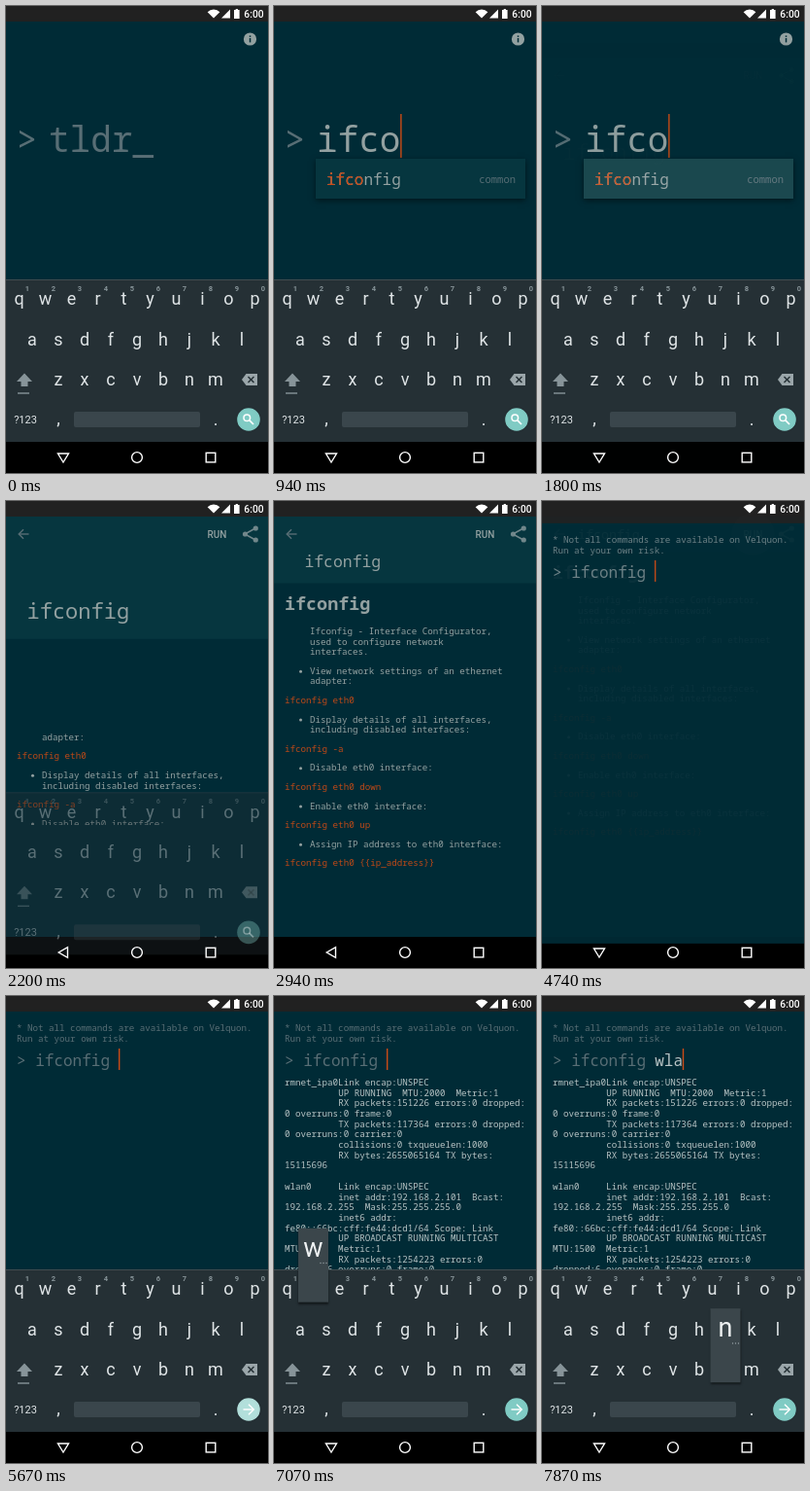
These frames come from a looping animation (270x480 px, 8 s). An HTML page with a canvas:

```html
<!DOCTYPE html>
<html lang="en">
<head>
<meta charset="utf-8">
<title>Command help app</title>
<style>
  html, body { margin: 0; width: 100%; height: 100%; overflow: hidden; background: #000; }
  canvas { display: block; width: 270px; height: 480px; }
</style>
</head>
<body>
<canvas id="stage"></canvas>
<script>
const W = 270, H = 480, LOOP = 8000;
const MONO = '"Noto Sans Mono", monospace', SANS = 'Roboto, sans-serif';
const BG = '#002b36', PANEL = '#06363f', DIM = '#586e75', SOFT = '#93a1a1', BRIGHT = '#b7c3c4', ORANGE = '#cb4b16';
const KEYBOARD = '#253035';

const canvas = document.getElementById('stage');
const ctx = canvas.getContext('2d');
const ratio = window.devicePixelRatio || 1;
canvas.width = W * ratio;
canvas.height = H * ratio;

const clamp = v => Math.max(0, Math.min(1, v));
const progress = (t, start, length) => clamp((t - start) / length);
const mix = (a, b, p) => a + (b - a) * p;

function rect(x, y, w, h, color) {
  ctx.fillStyle = color;
  ctx.fillRect(x, y, w, h);
}
function disc(x, y, r, color) {
  ctx.fillStyle = color;
  ctx.beginPath();
  ctx.arc(x, y, r, 0, 7);
  ctx.fill();
}
function shape(points, color, lineWidth, close) {
  ctx.beginPath();
  points.forEach(([x, y]) => ctx.lineTo(x, y));
  if (close) ctx.closePath();
  if (lineWidth) {
    ctx.strokeStyle = color;
    ctx.lineWidth = lineWidth;
    ctx.stroke();
  } else {
    ctx.fillStyle = color;
    ctx.fill();
  }
}
function text(str, x, y, size, color, { font = MONO, weight = 400, align = 'left' } = {}) {
  ctx.font = `${weight} ${size}px ${font}`;
  ctx.textAlign = align;
  ctx.fillStyle = color;
  ctx.fillText(str, x, y);
}
const label = (str, x, y, size, color, weight) => text(str, x, y, size, color, { font: SANS, weight, align: 'center' });

function layer(dy, alpha, draw) {
  ctx.save();
  ctx.globalAlpha = alpha;
  ctx.translate(0, dy);
  draw();
  ctx.restore();
}
function clipped(x, y, w, h, draw) {
  ctx.save();
  ctx.beginPath();
  ctx.rect(x, y, w, h);
  ctx.clip();
  draw();
  ctx.restore();
}
function raised(x, y, w, h, color, blur) {
  ctx.save();
  ctx.shadowColor = 'rgba(0,0,0,.5)';
  ctx.shadowBlur = blur * ratio;
  ctx.shadowOffsetY = 2 * ratio;
  rect(x, y, w, h, color);
  ctx.restore();
}

// Window with its own status and navigation bar backgrounds
function appWindow(draw) {
  rect(0, 0, W, 16, '#212121');
  rect(0, 16, W, 432, BG);
  rect(0, 448, W, 32, '#000');
  draw();
}
// A new window slides up and fades in
function enter(t, start, draw) {
  if (t < start) return;
  const dy = 38 * (1 - progress(t, start, 350)) ** 5;
  const alpha = 1 - (1 - progress(t, start, 200)) ** 4;
  layer(dy, alpha, () => appWindow(draw));
}

// Key presses: [key, down, up]
const presses = [
  ['i', 200, 270], ['f', 400, 470], ['c', 600, 670], ['o', 800, 870],
  ['w', 7070, 7200], ['l', 7340, 7470], ['a', 7540, 7670], ['n', 7870, 8000]
];
const typed = (t, from) => presses.filter(([, down, up]) => down >= from && t >= up).map(p => p[0]).join('');

const rows = [['qwertyuiop', 13.5, 307.3], ['asdfghjkl', 27, 348.6], ['zxcvbnm', 54, 389.8]];
const keys = {};
for (const [letters, x, y] of rows) [...letters].forEach((k, i) => keys[k] = [x + 27 * i, y]);

function keyboard(t) {
  const ink = '#dfe4e6', faint = '#879499', search = t < 3000;
  rect(0, 281, W, 167, KEYBOARD);
  rect(0, 281, W, 1, '#414c50');
  for (const k in keys) label(k, ...keys[k], 18, ink);
  [...'1234567890'].forEach((d, i) => label(d, 22 + 27 * i, 293, 7.5, faint, 700));
  shape([[11, 386], [19, 377.5], [27, 386], [22.5, 386], [22.5, 391], [15.5, 391], [15.5, 386]], faint, 0, true);
  rect(12, 397.3, 12, 1.4, faint);
  shape([[243, 384], [247.5, 378], [259, 378], [259, 390], [247.5, 390]], '#9ba6aa', 0, true);
  shape([[249.5, 381], [255.5, 387]], KEYBOARD, 1.5);
  shape([[255.5, 381], [249.5, 387]], KEYBOARD, 1.5);
  label('?123', 20, 429, 11, ink);
  label(',', 54, 430, 18, ink);
  label('.', 216, 431, 18, ink);
  ctx.fillStyle = '#3a464c';
  ctx.beginPath();
  ctx.roundRect(70, 417, 130, 16, 2);
  ctx.fill();
  disc(250, 425, 11.8, t >= 5670 && t < 5800 ? '#b2dfdb' : '#80cbc4');
  if (search) {
    ctx.beginPath();
    ctx.arc(248.3, 423.3, 3.3, 0, 7);
    ctx.strokeStyle = '#fff';
    ctx.lineWidth = 1.5;
    ctx.stroke();
    shape([[250.7, 425.7], [255, 430]], '#fff', 1.7);
  } else {
    shape([[244.5, 425], [255, 425]], '#fff', 1.4);
    shape([[250, 419.7], [255.3, 425], [250, 430.3]], '#fff', 1.4);
  }
}
function keyPopup(t) {
  const press = presses.find(([, down, up]) => t >= down && t < up);
  if (!press) return;
  const [x, y] = keys[press[0]];
  raised(x - 15.5, y - 68.6, 31, 76, '#3b464b', 2);
  label(press[0], x, y - 39.5, 27, '#eef1f2');
  for (let i = 0; i < 3; i++) disc(x + 7.5 + 3 * i, y - 32.8, .7, '#98a3a7');
}

function searchScreen(t) {
  const query = typed(t, 0).slice(0, 4);
  disc(251.5, 34, 6.6, SOFT);
  rect(250.8, 33, 1.5, 4.4, BG);
  rect(250.8, 30.4, 1.5, 1.5, BG);
  text('>', 10.7, 150, 36, DIM);
  text(query || 'tldr_', 44, 150, 36, query ? SOFT : DIM);
  if (query) rect(44 + 21.6 * query.length - .2, 111, 1.4, 45, ORANGE);
  const found = typed(t - 70, 0).length;
  if (!found) return;
  raised(43, 157, 216, 41, PANEL, 6);
  text('ifconfig', 54, 183.5, 16, SOFT);
  text('ifconfig'.slice(0, found), 54, 183.5, 16, ORANGE);
  text('common', 249, 181.5, 10.5, DIM, { align: 'right' });
  const p = progress(t, 1400, 450);
  if (p > 0) clipped(43, 157, 216, 41, () => disc(150, 178, 12 + 150 * p, 'rgba(255,255,255,.09)'));
}

// '-' marks a bullet, '$' a command
const help = [
  ' Ifconfig - Interface Configurator,\nused to configure network\ninterfaces.',
  '-View network settings of an ethernet\nadapter:', '$ifconfig eth0',
  '-Display details of all interfaces,\nincluding disabled interfaces:', '$ifconfig -a',
  '-Disable eth0 interface:', '$ifconfig eth0 down',
  '-Enable eth0 interface:', '$ifconfig eth0 up',
  '-Assign IP address to eth0 interface:', '$ifconfig eth0 {{ip_address}}'
];
function helpText() {
  text('ifconfig', 11, 80, 18.4, SOFT, { weight: 700 });
  let y = 105;
  for (const item of help) {
    const command = item[0] === '$';
    if (item[0] === '-') disc(27.5, y - 2.7, 1.5, SOFT);
    item.slice(1).split('\n').forEach((line, i) => {
      if (i) y += 10.6;
      text(line, command ? 11 : 37, y, 9.2, command ? '#bd4917' : SOFT);
    });
    y += 19.6;
  }
}
function detailScreen(t) {
  const open = (1 - progress(t, 2500, 1100)) ** 2;
  const shift = 89.3 * open;
  const body = () => layer(shift, ctx.globalAlpha, helpText);
  if (t >= 2270) clipped(0, 16, W, 432, body);
  else if (t >= 2140) clipped(0, 237.5, W, 95.5, body);
  rect(0, 16, W, 36.5 + shift, PANEL);
  text('ifconfig', mix(37, 21.5, open), mix(38.8, 121, open), mix(13.3, 22, open), SOFT);
  shape([[23.5, 34], [13.5, 34]], DIM, 1.4);
  shape([[18, 29.2], [13.2, 34], [18, 38.8]], DIM, 1.4);
  label('RUN', 217.5, 37.7, 10, SOFT, 500);
  const share = '#71878b';
  shape([[258, 27.5], [246, 34], [258, 40.5]], share, 1.5);
  for (const [x, y] of [[257.3, 28], [246.5, 34], [257.3, 40]]) disc(x, y, 2.6, share);
  const p = progress(t, 4540, 150);
  if (p > 0) disc(217.5, 34, 6 + 16 * p, 'rgba(255,255,255,.1)');
}

const output = `rmnet_ipa0Link encap:UNSPEC
          UP RUNNING  MTU:2000  Metric:1
          RX packets:151226 errors:0 dropped:
0 overruns:0 frame:0
          TX packets:117364 errors:0 dropped:
0 overruns:0 carrier:0
          collisions:0 txqueuelen:1000
          RX bytes:2655065164 TX bytes:
15115696

wlan0     Link encap:UNSPEC
          inet addr:192.168.2.101  Bcast:
192.168.2.255  Mask:255.255.255.0
          inet6 addr:
fe80::66bc:cff:fe44:dcd1/64 Scope: Link
          UP BROADCAST RUNNING MULTICAST
MTU:1500  Metric:1
          RX packets:1254223 errors:0
dropped:6 overruns:0 frame:0`.split('\n');

function runScreen(t) {
  const p = progress(t, 4740, 360);
  const ink = `rgb(${mix(115, 88, p)},${mix(134, 110, p)},${mix(138, 117, p)})`;
  const args = typed(t, 5000);
  text('* Not all commands are available on Velquon.', 11, 36.3, 9.2, ink);
  text('Run at your own risk.', 11, 47, 9.2, ink);
  text('> ifconfig', 11, 71.7, 16, ink);
  text(args, 116.2, 71.7, 16, BRIGHT);
  if (t < 6140 || t >= 6670) rect(116 + 9.6 * args.length, 54, 1.4, 22, ORANGE);
  if (t >= 5740) output.forEach((line, i) => {
    const indent = line.search(/\S|$/);
    text(line.trim(), 11 + 5.52 * indent, 91.8 + 10.7 * i, 9.2, BRIGHT);
  });
}

function systemIcons(t) {
  const white = '#fff';
  ctx.beginPath();
  ctx.moveTo(214, 12.5);
  ctx.arc(214, 12.5, 9, -Math.PI * .75, -Math.PI * .25);
  ctx.fillStyle = white;
  ctx.fill();
  shape([[222, 12.5], [231, 12.5], [231, 3.5]], white);
  rect(235, 4, 5.6, 9, white);
  rect(236.7, 3, 2.2, 1.2, white);
  label('6:00', 255.5, 12, 10.3, white, 500);
  const keyboardUp = t < 2150 || t >= 4700;
  shape(keyboardUp ? [[53.5, 460], [64.5, 460], [59, 469]] : [[63.5, 458.7], [63.5, 469.3], [54.3, 464]], white, 1.4, true);
  ctx.beginPath();
  ctx.arc(135, 464, 5.4, 0, 7);
  ctx.stroke();
  ctx.strokeRect(206.2, 459.3, 9.6, 9.6);
}

function render(t) {
  ctx.setTransform(ratio, 0, 0, ratio, 0, 0);
  if (t < 2200) appWindow(() => searchScreen(t));
  if (t < 5000) enter(t, 1800, () => detailScreen(t));
  enter(t, 4640, () => runScreen(t));

  const leave = progress(t, 2120, 150), arrive = progress(t, 4840, 280);
  if (leave < 1) layer(34 * leave, (1 - leave) ** 1.3, () => keyboard(t));
  else if (arrive > 0) layer(34 * (1 - arrive) ** 2, clamp(arrive * 1.6), () => keyboard(t));
  keyPopup(t);
  systemIcons(t);
}

const began = performance.now();
function tick() {
  render((performance.now() - began) % LOOP);
  requestAnimationFrame(tick);
}
tick();
</script>
</body>
</html>
```
